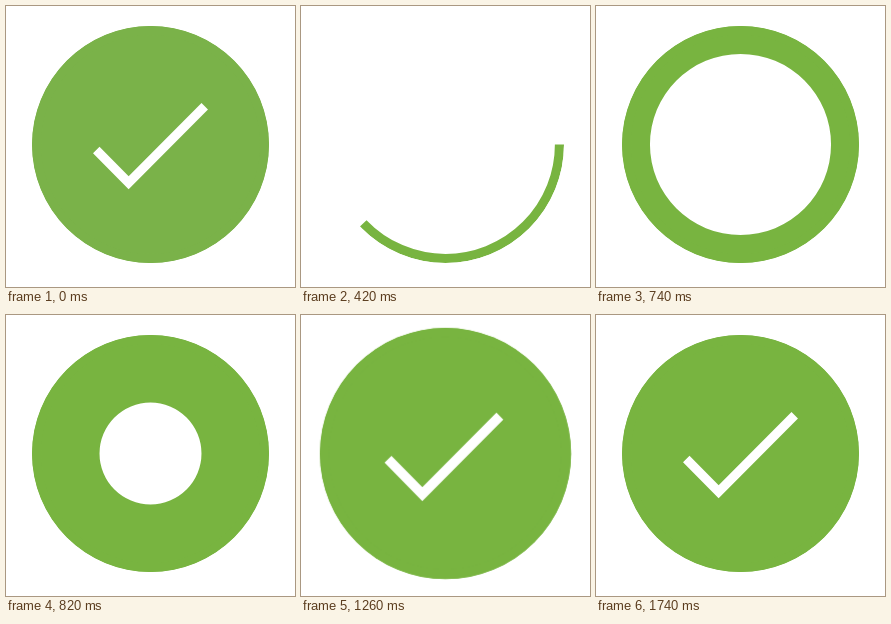
An HTML page that plays this animation: 289 by 281 pixels, repeating every 1.88 s.

```html
<!DOCTYPE html>
<html lang="en">
<head>
<meta charset="utf-8">
<title>Success checkmark</title>
<style>
  :root {
    --green: #78b440;
    --rest-green: #7ab249;
    --loop: 1880ms linear infinite both;
  }
  html, body {
    margin: 0;
    width: 100%;
    height: 100%;
    overflow: hidden;
    background: #fff;
  }
  .badge {
    position: absolute;
    left: 26px;
    top: 20px;
    width: 237px;
    height: 237px;
    border-radius: 50%;
    fill: none;
    stroke-width: 2;
    animation: fill var(--loop), pulse var(--loop);
  }
  .ring {
    stroke: var(--green);
    stroke-dasharray: 166;
    animation: ring var(--loop);
  }
  .check {
    stroke: #fff;
    stroke-dasharray: 48;
    animation: check var(--loop);
  }

  /* The finished badge shows for 20 ms, then everything resets at once. */
  @keyframes ring {
    0%, 1.05% { stroke: var(--rest-green); stroke-dashoffset: 0; }
    1.06% { stroke: var(--green); stroke-dashoffset: 166; }
    4.68% { stroke-dashoffset: 166; animation-timing-function: cubic-bezier(.65, 0, .45, 1); }
    41.81% { stroke-dashoffset: 0; }
    100% { stroke: var(--green); stroke-dashoffset: 0; }
  }
  @keyframes fill {
    0%, 1.05% { box-shadow: inset 0 0 0 119px var(--rest-green); }
    1.06% { box-shadow: inset 0 0 0 0 var(--green); }
    32.4% { box-shadow: inset 0 0 0 0 var(--green); animation-timing-function: ease-in-out; }
    53.3%, 100% { box-shadow: inset 0 0 0 119px var(--green); }
  }
  @keyframes check {
    0%, 1.05% { stroke-dashoffset: 0; }
    1.06% { stroke-dashoffset: 48; }
    55.32% { stroke-dashoffset: 48; animation-timing-function: cubic-bezier(.65, 0, .45, 1); }
    74.47%, 100% { stroke-dashoffset: 0; }
  }
  @keyframes pulse {
    0% { transform: scale(1); }
    61.7% { transform: scale(1); animation-timing-function: ease-in-out; }
    71.28% { transform: scale(1.1); animation-timing-function: ease-in-out; }
    80.85%, 100% { transform: scale(1); }
  }
</style>
</head>
<body>
<svg class="badge" viewBox="0 0 52 52">
  <circle class="ring" cx="26" cy="26" r="25"/>
  <path class="check" d="M14.1 27.2l7.1 7.2 16.7-16.8"/>
</svg>
</body>
</html>
```
